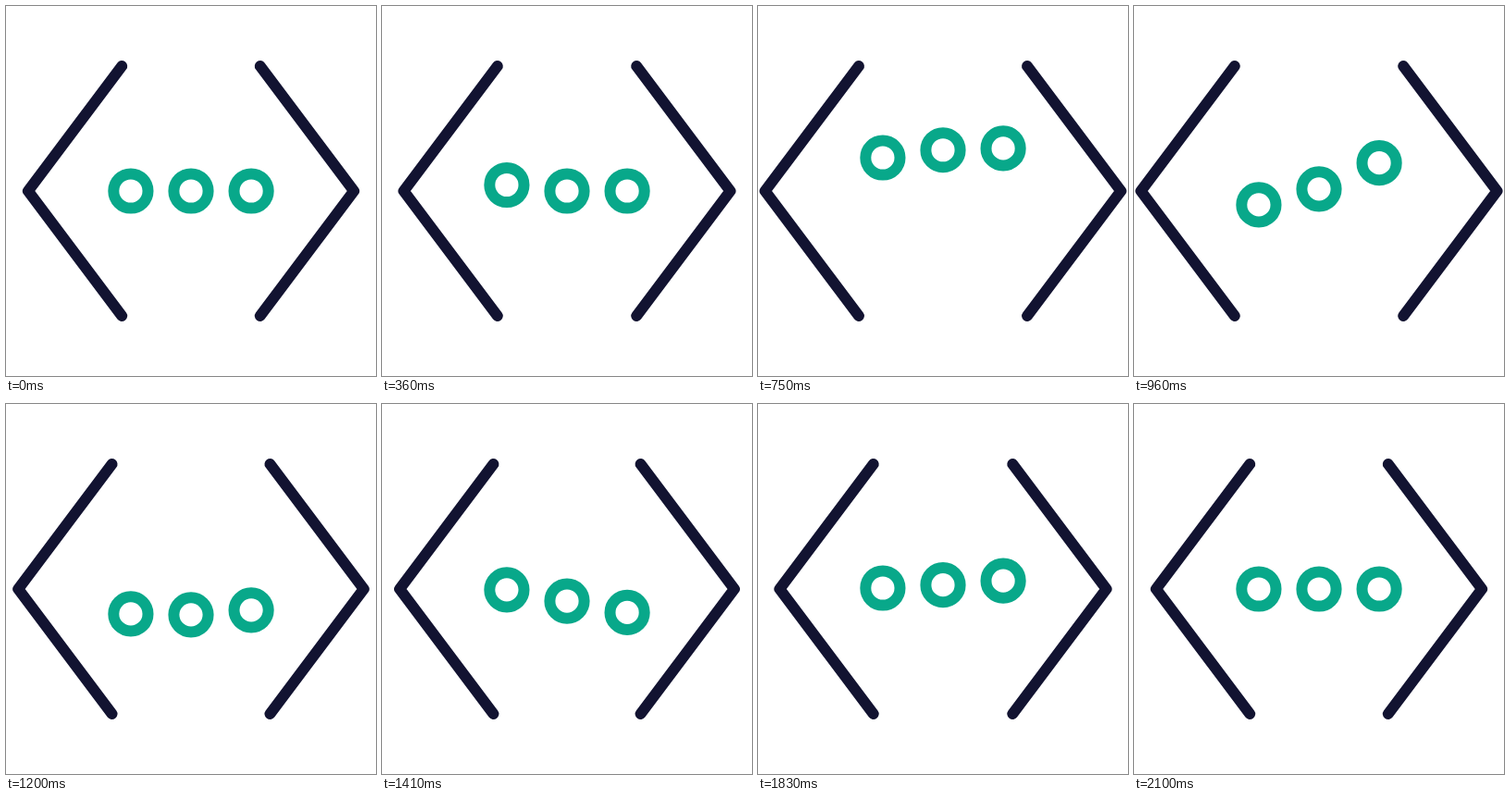
These frames come from a looping animation (400x400 px, 2.13 s). An HTML page with a canvas:

```html
<!DOCTYPE html>
<html lang="en">
<head>
<meta charset="utf-8">
<title>Code brackets</title>
<style>
  html, body { margin: 0; width: 100%; height: 100%; overflow: hidden; background: #fff; }
  canvas { display: block; width: 400px; height: 400px; }
</style>
</head>
<body>
<canvas id="stage" width="400" height="400"></canvas>
<script>
const ctx = document.getElementById('stage').getContext('2d');
const STEP = 30, STEPS = 71;
const DARK = '#121331', GREEN = '#08a88a';

// Bezier easing with handles (x1, 0) and (x2, 1), solved by bisection.
function ease(x1, x2) {
  return u => {
    let lo = 0, hi = 1, p = 0.5;
    for (let i = 0; i < 30; i++) {
      p = (lo + hi) / 2;
      const q = 1 - p;
      const x = 3 * p * q * q * x1 + 3 * p * p * q * x2 + p * p * p;
      if (x < u) lo = p; else hi = p;
    }
    return p * p * (3 - 2 * p);
  };
}

const glide = ease(0.33, 0.2);
const launch = ease(0.34, 0.37);
const swing = ease(0.5, 0.45);

// Keys are [step, value, easing towards this key].
const SPREAD = [[10.5, 0], [29, 16.74, glide], [70, 0, glide]];
const BOUNCE = [
  [10, 0], [20, -46.5, launch], [38, 27.9, swing],
  [53, -9.3, swing], [64, 0, swing]
];
const RINGS = [
  { x: 134.9, lag: 0 },
  { x: 200, lag: 2.5 },
  { x: 265.1, lag: 6 }
];

function valueAt(keys, k) {
  if (k <= keys[0][0]) return keys[0][1];
  for (let i = 1; i < keys.length; i++) {
    const [t0, v0] = keys[i - 1];
    const [t1, v1, curve] = keys[i];
    if (k < t1) return v0 + (v1 - v0) * curve((k - t0) / (t1 - t0));
  }
  return keys[keys.length - 1][1];
}

function bracket(dir, spread) {
  const tip = 200 + dir * (176.1 + spread);
  const end = 200 + dir * (74.8 + spread);
  ctx.beginPath();
  ctx.moveTo(end, 65);
  ctx.lineTo(tip, 200);
  ctx.lineTo(end, 335);
  ctx.stroke();
}

function ring(x, y) {
  ctx.beginPath();
  ctx.arc(x, y, 18.6, 0, Math.PI * 2);
  ctx.stroke();
}

function draw(k) {
  ctx.fillStyle = '#fff';
  ctx.fillRect(0, 0, 400, 400);
  ctx.lineWidth = 12;
  ctx.lineCap = ctx.lineJoin = 'round';

  ctx.strokeStyle = DARK;
  const spread = valueAt(SPREAD, k);
  bracket(-1, spread);
  bracket(1, spread);

  ctx.strokeStyle = GREEN;
  for (const { x, lag } of RINGS) ring(x, 200 + valueAt(BOUNCE, k - lag));
}

const start = performance.now();
function tick() {
  const t = Math.max(0, performance.now() - start);
  draw(Math.floor(t / STEP) % STEPS);
  requestAnimationFrame(tick);
}
tick();
</script>
</body>
</html>
```
